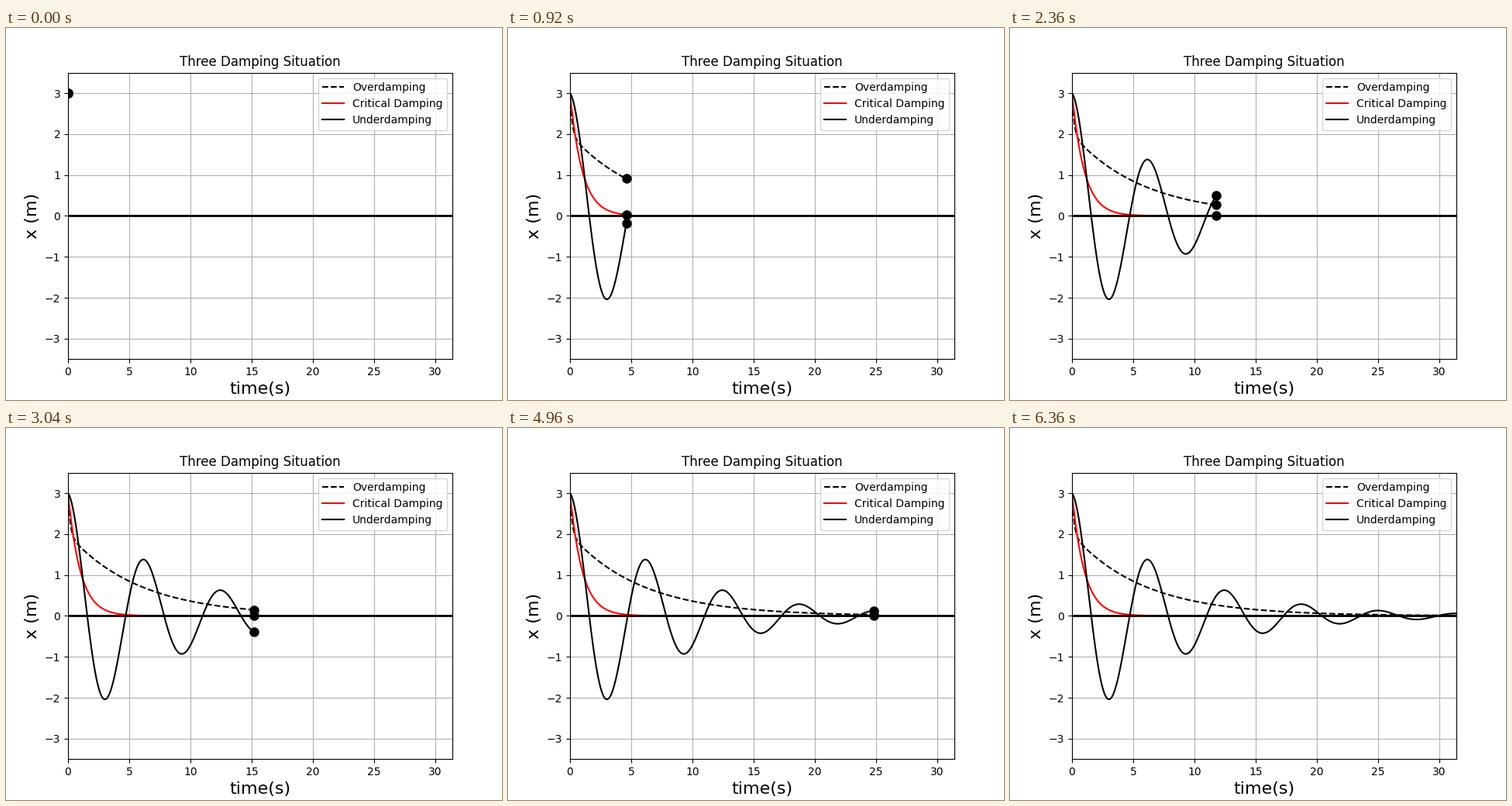
A matplotlib script for the animation above (10 s loop, 640 by 480 pixels).

```python
import numpy as np
import matplotlib.pyplot as plt
from matplotlib.animation import FuncAnimation

DT = 0.1           # seconds of motion per frame
LAST = 318         # frame at which the markers have left the axes
FRAMES, INTERVAL = 500, 20
AMP = 3.0

t = np.arange(LAST + 1) * DT
root = np.sqrt(8)
over = 2 * np.exp((root - 3) * t) + np.exp(-(root + 3) * t)
critical = AMP * np.exp(-t)
under = AMP * np.exp(-t / 8) * np.cos(t)

fig, ax = plt.subplots(figsize=(6.4, 4.8), dpi=100)
ax.set_xlim(0, 10 * np.pi)
ax.set_ylim(-3.5, 3.5)
ax.set_title("Three Damping Situation", y=1.0)
ax.set_xlabel("time(s)", fontsize=16)
ax.set_ylabel("x (m)", fontsize=16)
ax.grid(True)

styles = [
    (over, "k--", "Overdamping"),
    (critical, "r-", "Critical Damping"),
    (under, "k-", "Underdamping"),
]
curves = [(x, ax.plot([], [], fmt, label=name)[0]) for x, fmt, name in styles]
ax.axhline(0, color="k", lw=2)
dots = [(x, ax.plot([], [], "ko", ms=8)[0]) for x, _, _ in styles]
ax.legend(loc="upper right")


def update(frame):
    n = min(frame, LAST)
    for x, line in curves:
        line.set_data(t[:n + 1], x[:n + 1])
    for x, dot in dots:
        dot.set_data(t[n:n + 1], x[n:n + 1])
    return [artist for _, artist in curves + dots]


def init():
    return update(0)


anim = FuncAnimation(fig, update, frames=FRAMES, init_func=init,
                     interval=INTERVAL, repeat=True, repeat_delay=0)
plt.show()
```
